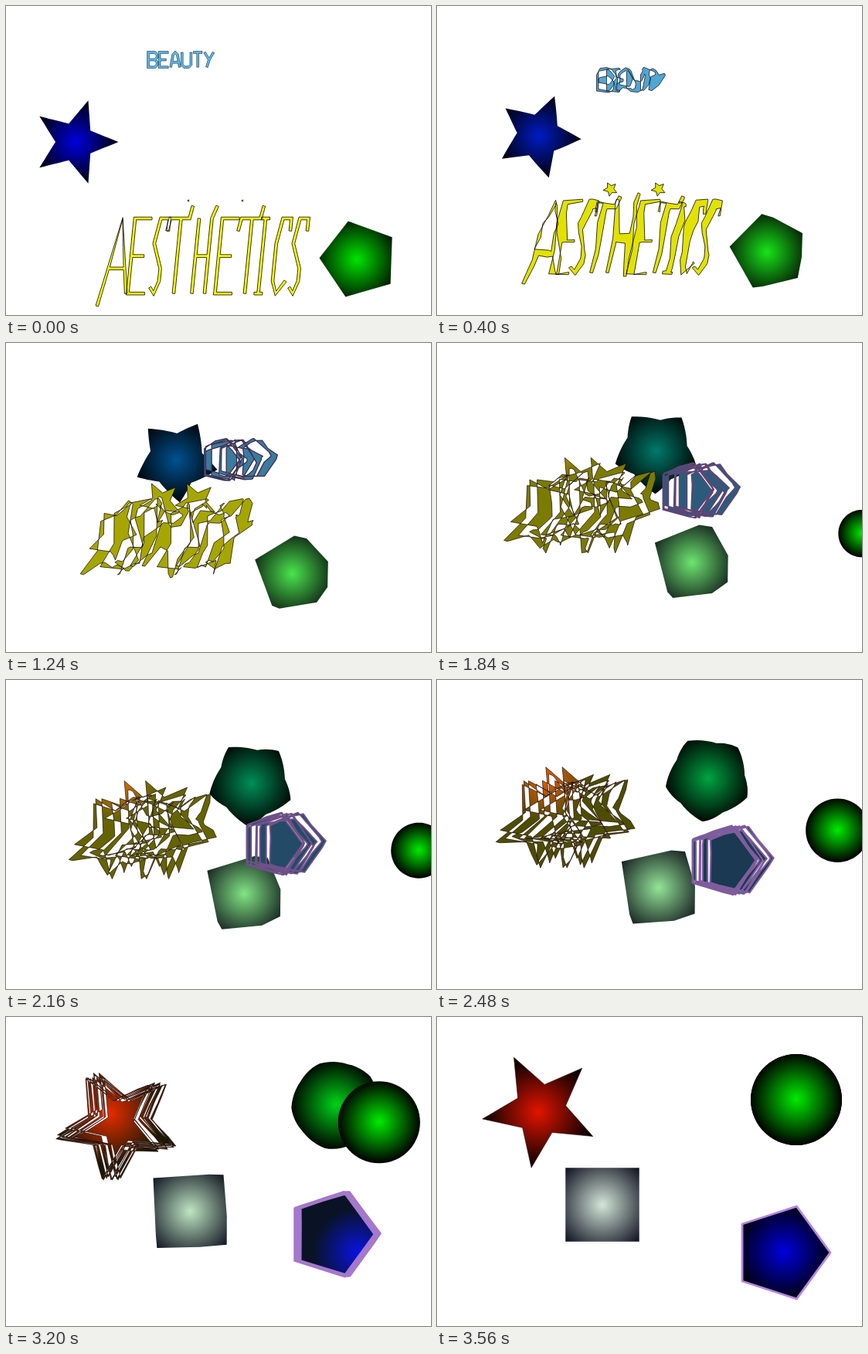
An HTML page with a canvas for the animation above (3600 ms loop, 550x400 px).

```html
<!DOCTYPE html>
<html lang="en">
<head>
<meta charset="utf-8">
<title>Beauty and aesthetics</title>
<style>
html, body { margin: 0; width: 100%; height: 100%; overflow: hidden; background: #fff; }
canvas { display: block; }
</style>
</head>
<body>
<canvas id="stage" width="550" height="400" role="img" aria-label="BEAUTY AESTHETICS"></canvas>
<script>
const STEP = 40, STEPS = 90, TAU = 2 * Math.PI;
const ctx = document.getElementById('stage').getContext('2d');

const mix = (a, b, p) => a.map((v, i) => v + (b[i] - v) * p);
const rgb = c => `rgb(${c.map(Math.round).join()})`;

// ---- outlines ----
function ring(cx, cy, radii, n, deg) {
  return Array.from({ length: n }, (_, i) => {
    const a = TAU * (deg / 360 + i / n), r = radii[i % radii.length];
    return [cx + r * Math.cos(a), cy + r * Math.sin(a)];
  });
}

const points = flat => flat.flatMap((x, i) => i % 2 ? [] : [[x, flat[i + 1]]]);

// a single pen stroke, walked there and back
function stroke(...flat) {
  const there = points(flat);
  return [...there, ...there.slice(1, -1).reverse()];
}

// a closed clockwise walk around a letter's skeleton
const walk = (...flat) => points(flat);

// pushes a walk out to its left by half the pen width
function inked(path, half) {
  const normal = (a, b) => {
    const d = Math.hypot(b[0] - a[0], b[1] - a[1]);
    return [(b[1] - a[1]) / d, (a[0] - b[0]) / d];
  };
  return path.flatMap((p, i) => {
    const m = normal(path.at(i - 1), p);
    const n = normal(p, path[(i + 1) % path.length]);
    const dot = m[0] * n[0] + m[1] * n[1];
    const off = (x, y, k) => [p[0] + x * k, p[1] + y * k];
    if (dot < -0.98) return [off(...m, half), off(...n, half)];
    return [off(m[0] + n[0], m[1] + n[1], half / Math.max(1 + dot, 0.5))];
  });
}

// clockwise, starting from the lower left foot
function fromFoot(poly) {
  const area = poly.reduce((s, [x, y], i) => {
    const [x2, y2] = poly[(i + 1) % poly.length];
    return s + x * y2 - x2 * y;
  }, 0);
  const turned = area < 0 ? [...poly].reverse() : poly;
  const reach = turned.map(([x, y]) => x - y / 2);
  const k = reach.indexOf(Math.min(...reach));
  return [...turned.slice(k), ...turned.slice(0, k)];
}

// ---- pairing two outlines by arc length from their first points ----
function measure(poly) {
  const u = [0];
  poly.forEach((a, i) => {
    const b = poly[(i + 1) % poly.length];
    u.push(u[i] + Math.hypot(b[0] - a[0], b[1] - a[1]));
  });
  return { poly, u: u.map(v => v / u[poly.length]) };
}

function pointAt({ poly, u }, t) {
  const i = u.findIndex(v => v > t) - 1;
  return mix(poly[i], poly[(i + 1) % poly.length], (t - u[i]) / (u[i + 1] - u[i]));
}

function pair(from, to) {
  const a = measure(from), b = measure(to);
  return [...a.u, ...b.u].filter(t => t < 1).sort((m, n) => m - n)
    .map(t => [pointAt(a, t), pointAt(b, t)]);
}

// ---- letter skeletons on a grid six units high ----
const bowl = y => walk(0, y, 0, y + 3, 3, y + 3, 4, y + 2, 4, y + 1, 3, y);
const E = [walk(4, 0, 0, 0, 0, 3, 3, 3, 0, 3, 0, 6, 4, 6, 0, 6, 0, 0)];

const plain = {
  A: [walk(0, 6, 1, 1, 2, 0, 3, 1, 4, 6, 3.6, 4, 0.4, 4), walk(2, 0, 1, 1, 0.4, 4, 3.6, 4, 3, 1)],
  B: [walk(0, 0, 3, 0, 4, 1, 4, 2, 3, 3, 4, 4, 4, 5, 3, 6, 0, 6), bowl(0), bowl(3)],
  E,
  T: [walk(0, 0, 4, 0, 2, 0, 2, 6, 2, 0)],
  U: [stroke(0, 0, 0, 5, 1, 6, 3, 6, 4, 5, 4, 0)],
  Y: [walk(0, 0, 2, 3, 4, 0, 2, 3, 1, 6, 2, 3)]
};

const script = {
  A: [walk(-4, 7, 0, 0, 2.5, 6, 1.7, 4, -2.3, 4), walk(0, 0, -2.3, 4, 1.7, 4)],
  C: [stroke(3, 1, 3, 0, 1, 0, 0, 2, 0, 5, 1, 6, 3, 5)],
  E,
  H: [walk(0, 0, 0, 3, 3, 3, 3, 0, 4, -1, 3, 0, 3, 6, 3, 3, 0, 3, 0, 6)],
  I: [walk(-1, 0, 1, 0, 0, 0, 0, 6, 1, 6, -1, 6, 0, 6, 0, 0)],
  S: [stroke(3, 1, 3, 0, 1, 0, 0, 2, 2, 4, 2, 5, 1, 6, 0, 5.5)],
  T: [walk(0, 1, 0.5, 0, 5, 0, 5.5, -1, 5, 0, 3, 0, 3, 6, 3, 0, 0.5, 0)]
};

function write(word, font, { left, top, sx, sy, slant, half }) {
  return [...word].flatMap((ch, i) => font[ch].map(path => fromFoot(inked(
    path.map(([x, y]) => [left(i) + sx * x - slant * y, top + sy * y]), half))));
}

const beauty = write('BEAUTY', plain, {
  left: i => 184 + 14.6 * i, top: 60, sx: 2.9, sy: 3.2, slant: 0, half: 1.4
});

const pens = [151, 167, 195, 210, 250, 280, 302, 336, 353, 375];
const aesthetics = write('AESTHETICS', script, {
  left: i => pens[i], top: 275, sx: 5.5, sy: 16.2, slant: 1.6, half: 1.8
});
for (const x of [236, 306]) aesthetics.push(ring(x, 252, [1.3], 3, 180));

const redStar = ring(134, 120, [76, 33], 10, 171);
const bluePentagon = ring(446, 305, [63], 5, 144);
const disc = deg => ring(465, 107, [59], 60, deg);

// ---- shapes: glow is gradient x, y, radius ----
const BLACK = [0, 0, 0], GREEN = [0, 236, 0], BLUE = [0, 0, 222];
const YELLOW = [255, 255, 0], SKY = [89, 188, 238];

const shapes = [
  {
    loops: [pair(ring(89, 176, [56.5, 25], 10, 0), disc(36))],
    glow: [[90, 176, 58], [465, 106, 60]],
    core: [BLUE, GREEN], rim: [BLACK, BLACK]
  },
  {
    loops: [pair(ring(457, 328, [51.5], 5, 182), ring(214, 243, [67.5], 4, 225))],
    glow: [[454, 328, 60], [214, 243, 66]],
    core: [[0, 228, 0], [212, 230, 217]], rim: [BLACK, [16, 19, 34]]
  },
  {
    loops: [pair(ring(641, 396, [0.5], 60, 0), disc(0))],
    glow: [[641, 396, 0.5], [465, 106, 60]],
    core: [GREEN, GREEN], rim: [BLACK, BLACK]
  },
  {
    loops: aesthetics.map(g => pair(g, redStar)),
    glow: [[165, 140, 10], [131, 123, 74]],
    core: [YELLOW, [226, 20, 0]], rim: [YELLOW, BLACK],
    line: [BLACK, [40, 8, 0]], width: [0.8, 0.6]
  },
  {
    loops: beauty.map(g => pair(g, bluePentagon)),
    glow: [[510, 310, 20], [449, 304, 62]],
    core: [SKY, BLUE], rim: [SKY, [0, 0, 14]],
    line: [BLACK, [182, 134, 226]], width: [0.5, 2.8]
  }
];

function drawShape(shape, p) {
  const tween = ([a, b]) => mix(a, b, p);
  const [x, y, r] = tween(shape.glow);
  const fill = ctx.createRadialGradient(x, y, 0, x, y, r);
  fill.addColorStop(0, rgb(tween(shape.core)));
  fill.addColorStop(1, rgb(tween(shape.rim)));

  // all outlines coincide at the end, so one is enough there
  const loops = p === 1 ? shape.loops.slice(0, 1) : shape.loops;
  const path = new Path2D();
  for (const loop of loops) {
    path.moveTo(...tween(loop[0]));
    for (const pt of loop.slice(1)) path.lineTo(...tween(pt));
    path.closePath();
  }
  ctx.fillStyle = fill;
  ctx.fill(path, 'evenodd');
  if (shape.line) {
    ctx.strokeStyle = rgb(tween(shape.line));
    ctx.lineWidth = shape.width[0] + (shape.width[1] - shape.width[0]) * p;
    ctx.lineJoin = 'round';
    ctx.stroke(path);
  }
}

let start = null;
function play(now) {
  if (start === null) start = now;
  const p = (Math.floor((now - start) / STEP) % STEPS) / (STEPS - 1);
  ctx.fillStyle = '#fff';
  ctx.fillRect(0, 0, 550, 400);
  for (const shape of shapes) drawShape(shape, p);
  requestAnimationFrame(play);
}
requestAnimationFrame(play);
</script>
</body>
</html>
```
